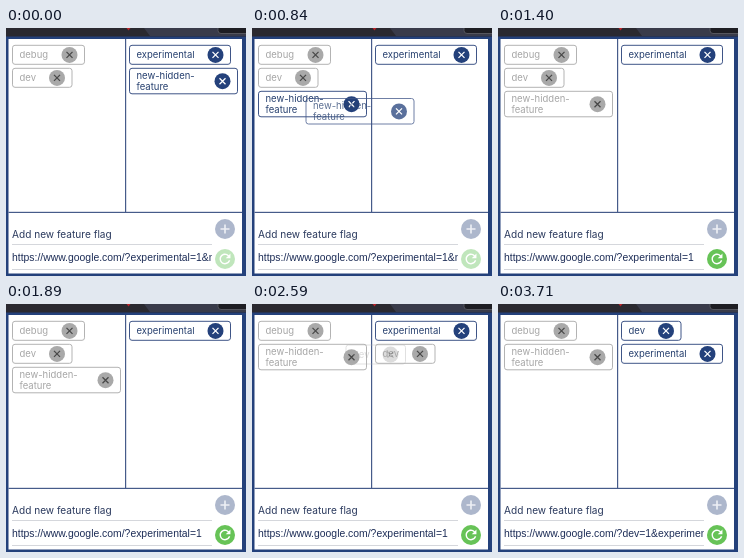
An HTML page that plays this animation: 240 px wide and 248 px high, repeating every 4550 ms.

```html
<!DOCTYPE html>
<html lang="en">
<head>
<meta charset="utf-8">
<title>Feature flags</title>
<style>
html, body { margin: 0; width: 100%; height: 100%; overflow: hidden; background: #fff; }
svg { display: block; width: 240px; height: 248px; }
text { font-family: Inter, Roboto, sans-serif; font-size: 9.5px; white-space: pre; }
#label { font-size: 10.1px; fill: #2b3a5e; }
#url { font-family: "Liberation Sans", Arial, sans-serif; font-size: 10.4px; fill: #1d2d57; }
.on { --line: #3f5587; --ink: #27406f; --dot: #24417b; --cross: #fff; }
.off { --line: #b3b3b3; --ink: #a6a6a6; --dot: #a9a9a9; --cross: #484848; }
.chip rect { fill: none; stroke: var(--line); }
.chip text { fill: var(--ink); }
.chip circle { fill: var(--dot); }
.chip path { stroke: var(--cross); stroke-width: 1.3; }
.navy { fill: #24417b; }
.rule { fill: #465b8a; }
</style>
</head>
<body>
<svg viewBox="0 0 240 248" xmlns="http://www.w3.org/2000/svg">
  <defs><clipPath id="field"><rect x="5" y="220" width="201" height="22"/></clipPath></defs>
  <rect width="240" height="248" fill="#fff"/>
  <rect width="240" height="9" fill="#2a2930"/>
  <path d="M138 0H240V8H144Z" fill="#393b4a"/>
  <path d="M212 -1H241V5.500H215Q212 5.500 212 2.500Z" fill="#1d1d23" stroke="#55565e"/>
  <path d="M120.500 0H124.500L122.500 2.500Z" fill="#b8242a"/>
  <path class="navy" d="M0 8.500H240V248H0ZM2.500 11V245.500H236V11Z" fill-rule="evenodd"/>
  <rect class="rule" x="119" y="11" width="1.200" height="173"/>
  <rect class="rule" x="2.500" y="183.800" width="233.500" height="1.200"/>
  <text id="label" x="6" y="210">Add new feature flag</text>
  <path d="M6 216.500H206M6 241.500H206" stroke="#d5d7dc"/>
  <text id="url" x="6" y="233.300" clip-path="url(#field)"></text>
  <circle cx="219" cy="201" r="10" fill="#adb7cc"/>
  <path d="M214.500 201H223.500M219 196.500V205.500" stroke="#eef0f5" stroke-width="1.600"/>
  <circle id="button" cx="219" cy="231" r="10"/>
  <path id="arrow" fill="#fff" d="M17.650 6.350A7.960 7.960 0 0 0 12 4c-4.420 0-7.990 3.580-7.990 8s3.570 8 7.990 8c3.730 0 6.840-2.550 7.730-6h-2.080A6 6 0 0 1 12 18c-3.310 0-6-2.690-6-6s2.690-6 6-6c1.660 0 3.140.690 4.220 1.780L13 11h7V4z"/>
  <g id="chips"></g>
</svg>
<script>
const LOOP = 4550, TICK = 70;
const LEFT = 6.5, RIGHT = 123.5, ROWS = [17.3, 40.3, 63.3];
const $ = id => document.getElementById(id);
const lerp = (a, b, k) => a + (b - a) * k;
const clamp = k => Math.max(0, Math.min(1, k));

// Drag paths as [time, x, y]
const HIDE_PATH = [[700, 120, 45], [770, 91, 58], [840, 54, 70.5], [910, 32, 80], [980, 17, 87], [1050, 12, 86.5]];
const DEV_PATH = [[2450, 29, 40.5], [2590, 94, 41], [2660, 118, 42], [2730, 131, 43]];

function along(path, t) {
  const i = path.findIndex(p => p[0] > t);
  if (i < 0) return path[path.length - 1].slice(1);
  if (i === 0) return path[0].slice(1);
  const [a, b] = [path[i - 1], path[i]];
  const k = (t - a[0]) / (b[0] - a[0]);
  return [lerp(a[1], b[1], k), lerp(a[2], b[2], k)];
}

function makeChip(lines, width) {
  const tall = lines.length > 1;
  const height = tall ? 25.5 : 19;
  const cx = width - 15, cy = tall ? 12.9 : 9.6;
  const g = document.createElementNS("http://www.w3.org/2000/svg", "g");
  const label = lines.map((s, i) =>
    `<text x="7" y="${tall ? 10.7 + 11 * i : 13.2}">${s}</text>`).join("");
  g.innerHTML = `<rect width="${width}" height="${height}" rx="2.5"/>${label}
    <circle cx="${cx}" cy="${cy}" r="8"/>
    <path d="M${cx - 3} ${cy - 3}l6 6m0 -6l-6 6"/>`;
  $("chips").append(g);
  return g;
}

function place(chip, x, y, on, opacity = 1) {
  chip.setAttribute("transform", `translate(${x} ${y})`);
  chip.setAttribute("class", on ? "chip on" : "chip off");
  chip.setAttribute("opacity", opacity);
}

const HIDDEN = ["new-hidden-", "feature"];
const debug = makeChip(["debug"], 72);
const dev = makeChip(["dev"], 59.5);
const experimental = makeChip(["experimental"], 101);
const hidden = makeChip(HIDDEN, 108);
const hiddenGhost = makeChip(HIDDEN, 108);
const devGhost = makeChip(["dev"], 59.5);

function ghost(chip, path, end, t, on, opacity) {
  const [x, y] = along(path, t);
  place(chip, x, y, on, t >= path[0][0] && t < end ? opacity : 0);
}

function render(t) {
  const hidLeft = t >= 840, hidOff = t >= 1190;
  const devRight = t >= 2590, devOn = t >= 2870;

  place(debug, LEFT, ROWS[0], false);
  place(dev, devRight ? RIGHT : LEFT, ROWS[devOn ? 0 : 1], devOn);
  place(experimental, RIGHT, ROWS[devOn ? 1 : 0], true);
  place(hidden, hidLeft ? LEFT : RIGHT, ROWS[hidLeft && !devRight ? 2 : 1], !hidOff);
  ghost(hiddenGhost, HIDE_PATH, 1190, t, true, 0.75);
  ghost(devGhost, DEV_PATH, 2870, t, false, 0.4);

  const query = devOn ? "dev=1&experimental=1"
    : hidOff ? "experimental=1" : "experimental=1&new-hidden-feature=1";
  $("url").textContent = "https://www.google.com/?" + query;

  const k = clamp((t - 1120) / 280);
  const rgb = [lerp(192, 103, k), lerp(230, 195, k), lerp(188, 87, k)].map(Math.round);
  $("button").setAttribute("fill", `rgb(${rgb})`);
  const turn = 360 * clamp((t - 3500) / 210);
  $("arrow").setAttribute("transform",
    `translate(219 231) rotate(${turn}) scale(.68) translate(-12 -12)`);
}

const start = performance.now();
function frame() {
  const t = (performance.now() - start) % LOOP;
  render(Math.floor(t / TICK) * TICK);
  requestAnimationFrame(frame);
}
frame();
</script>
</body>
</html>
```
